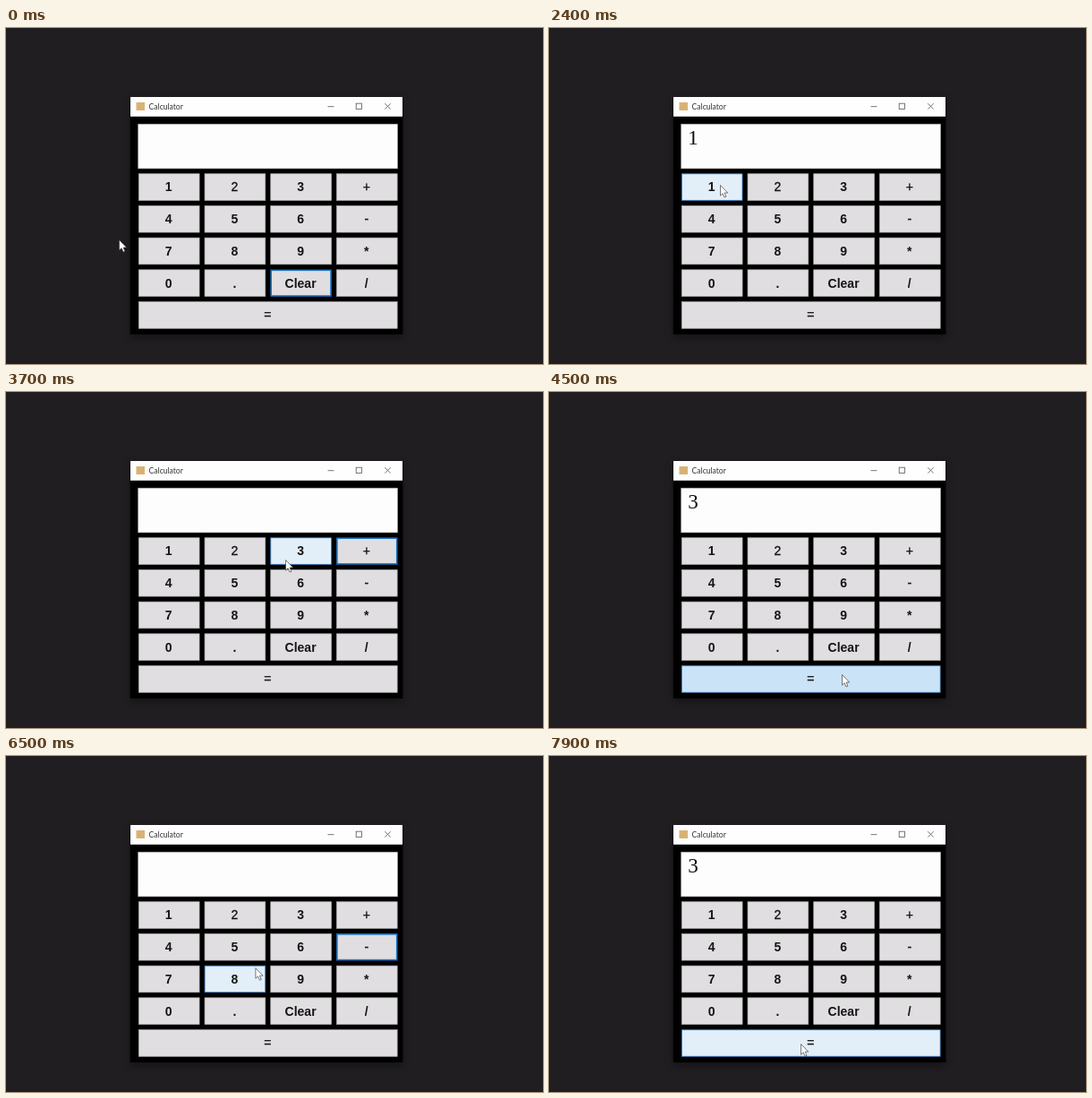
Animation of 600x375 px, one loop 8000 ms. Source, as an HTML page:

```html
<!DOCTYPE html>
<html lang="en">
<head>
<meta charset="utf-8">
<title>Calculator</title>
<style>
  html, body { margin: 0; width: 100%; height: 100%; overflow: hidden; background: #201e21; }
  svg { display: block; width: 100vw; height: 100vh; }
  .key { font: bold 14px "Liberation Sans", Arial, sans-serif; text-anchor: middle; fill: #151515; }
  .light { font-weight: normal; stroke: #151515; stroke-width: .35; }
  .title { font: 8.6px Lato, "Open Sans", sans-serif; fill: #333; }
  .readout { font: 23px "Liberation Serif", "Times New Roman", serif; fill: #111; }
</style>
</head>
<body>
<svg viewBox="0 0 600 375">
  <defs>
    <filter id="blur" x="-20%" y="-20%" width="140%" height="140%"><feGaussianBlur stdDeviation="5"/></filter>
  </defs>
  <rect width="600" height="375" fill="#201e21"/>
  <rect x="139" y="80" width="304" height="265" fill="#000" opacity=".4" filter="url(#blur)"/>
  <rect x="138.8" y="77" width="304.5" height="265" fill="#000"/>
  <rect x="139" y="77" width="304" height="21.8" fill="#fefefe"/>
  <rect x="145.5" y="83" width="9.5" height="9" fill="#d8b273"/>
  <text class="title" x="159.6" y="90.8">Calculator</text>
  <g fill="none" stroke="#555" stroke-width=".8">
    <path d="M359.5 87.7h7M423.3 84.2l6.4 6.4M429.7 84.2l-6.4 6.4"/>
    <rect x="391.2" y="84.2" width="6.2" height="6.2"/>
  </g>
  <rect x="147.7" y="107.2" width="289.8" height="49.7" fill="#fefdfe" stroke="#aaa" stroke-width=".6"/>
  <text class="readout" id="readout" x="155.3" y="129.5"></text>
  <g id="keys"></g>
  <path id="cursor" d="M0 0V11.6L2.6 9.2L4.5 13.5L6.4 12.7L4.6 8.5H8.2Z" fill="#fff" stroke="#333" stroke-width=".65" stroke-linejoin="round"/>
</svg>
<script>
const LOOP = 8000, STEP = 100;
const WAIT = 100, HOLD = 200; // pause before a press, length of a press
const NS = "http://www.w3.org/2000/svg";
const readout = document.getElementById("readout");
const cursor = document.getElementById("cursor");
const keyLayer = document.getElementById("keys");

// Each move ends with a click on a key; bow bends the way there.
const start = [126.5, 236.5];
const moves = [
  { leave: 0, arrive: 1250, to: [191.5, 175.5], bow: [40, 18], key: "1", shows: "1" },
  { leave: 2500, arrive: 2900, to: [400, 181], bow: [0, 42], key: "+", shows: "" },
  { leave: 3400, arrive: 3700, to: [312.5, 187.5], bow: [0, 0], key: "3", shows: "3" },
  { leave: 3800, arrive: 4300, to: [327.5, 315.5], bow: [0, 0], key: "=", shows: "4" },
  { leave: 5200, arrive: 5700, to: [413.6, 208.6], bow: [0, 0], key: "-", shows: "" },
  { leave: 6100, arrive: 6800, to: [191.5, 184], bow: [0, 45], key: "1", shows: "1" },
  { leave: 7000, arrive: 7600, to: [281.6, 321.6], bow: [-20, 30], key: "=", shows: "3" }
];

function setAttrs(node, attrs) {
  for (const name in attrs) node.setAttribute(name, attrs[name]);
  return node;
}

function add(name, attrs) {
  return keyLayer.appendChild(setAttrs(document.createElementNS(NS, name), attrs));
}

function makeKey(label, x, y, w) {
  const h = 30.3;
  const rect = add("rect", {});
  const style = "2+-=".includes(label) ? "key light" : "key";
  add("text", { class: style, x: x + w / 2 - .5, y: y + 20 }).textContent = label;
  return { label, x, y, w, h, rect };
}

const rows = ["1 2 3 +", "4 5 6 -", "7 8 9 *", "0 . Clear /"];
const keys = rows.flatMap((row, r) =>
  row.split(" ").map((label, c) => makeKey(label, 148 + c * 73.7, 162.4 + r * 35.7, 68.4)));
keys.push(makeKey("=", 148, 305.3, 289.5));

function stateAt(t) {
  const state = { pos: start, focus: "Clear", down: "", shown: "" };
  for (const { leave, arrive, to, bow, key, shows } of moves) {
    if (t < leave) break;
    const u = Math.min(1, (t - leave) / (arrive - leave));
    const s = u * u * (3 - 2 * u);
    state.pos = state.pos.map((from, i) => from + (to[i] - from) * s + 4 * bow[i] * s * (1 - s));
    const press = arrive + WAIT, release = press + HOLD;
    if (t >= press) state.focus = key;
    if (t >= press && t < release) state.down = key;
    if (t >= release) state.shown = shows;
  }
  return state;
}

function keyLook(key, { pos: [x, y], focus, down }) {
  const over = x >= key.x && x < key.x + key.w && y >= key.y && y < key.y + key.h;
  if (down === key.label) return ["#cbe3f6", "#4a90cc", .8];
  if (over) return ["#e2eff9", "#3b86cc", .8];
  if (focus === key.label) return ["#e0dee0", "#1f74c8", 1.6];
  return ["#e0dee0", "#b4b2b4", .7];
}

function render(t) {
  const state = stateAt(t);
  for (const key of keys) {
    const [fill, stroke, line] = keyLook(key, state);
    setAttrs(key.rect, {
      x: key.x + line / 2, y: key.y + line / 2,
      width: key.w - line, height: key.h - line,
      fill, stroke, "stroke-width": line
    });
  }
  readout.textContent = state.shown;
  cursor.setAttribute("transform", `translate(${state.pos})`);
}

const begin = performance.now();
function tick() {
  const t = (performance.now() - begin) % LOOP;
  render(Math.floor(t / STEP) * STEP);
  requestAnimationFrame(tick);
}
tick();
</script>
</body>
</html>
```
